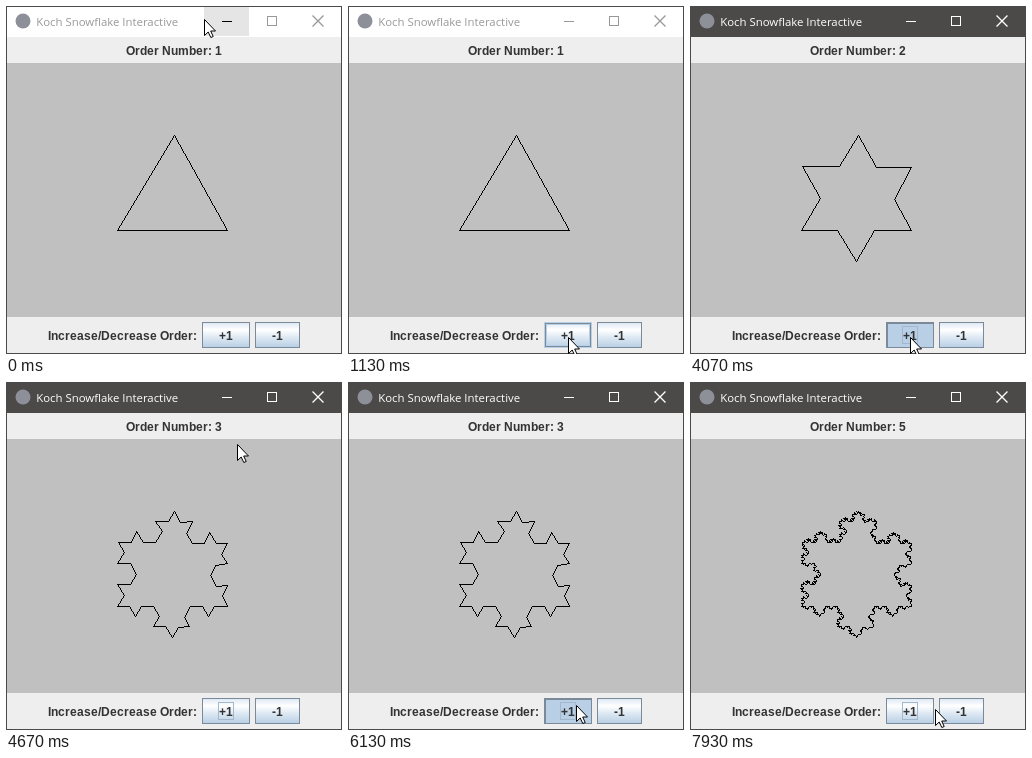
Animation, 336 px wide and 348 px high, one loop 8000 ms. Source, as an HTML page:

```html
<!DOCTYPE html>
<html lang="en">
<head>
<meta charset="utf-8">
<title>Koch Snowflake Interactive</title>
<style>
  html, body { margin: 0; width: 100%; height: 100%; overflow: hidden; }
  svg { display: block; width: 100vw; height: 100vh; }
  .crisp { shape-rendering: crispEdges; }
  .caption { font: 11.4px "Open Sans", "Noto Sans", sans-serif; fill: #999; }
  .label { font: bold 12px "Liberation Sans", Arial, sans-serif; fill: #333; }
  .control { fill: none; stroke: #999; }
  .bar { fill: #fff; }
  .active .bar { fill: #4c4a48; }
  .active .caption { fill: #fff; }
  .active .control { stroke: #fff; }
  #minHover, #rollover, #pressed, #focus { visibility: hidden; }
  .minimise #minHover, .over #rollover, .down #pressed, .active #focus { visibility: visible; }
  .down #rollover { visibility: hidden; }
  .minimise #min { stroke: #000; }
</style>
</head>
<body>
<svg id="stage" viewBox="0 0 336 348">
  <defs>
    <linearGradient id="ocean" x2="0" y2="1">
      <stop offset="0" stop-color="#dde8f3"/>
      <stop offset=".3" stop-color="#fff"/>
      <stop offset=".6" stop-color="#dde8f3"/>
      <stop offset="1" stop-color="#b8cfe5"/>
    </linearGradient>
  </defs>

  <g class="crisp">
    <rect width="336" height="348" fill="#4c4a48"/>
    <rect x="1" y="1" width="334" height="346" fill="#eee"/>
    <rect class="bar" x="1" y="1" width="334" height="30"/>
    <rect x="1" y="57" width="334" height="254" fill="#c0c0c0"/>
    <rect id="minHover" x="198" y="1" width="45" height="29" fill="#e5e5e5"/>
  </g>
  <circle cx="17" cy="15" r="7.5" fill="#8d8f99"/>
  <text class="caption" x="30.2" y="20">Koch Snowflake Interactive</text>
  <path id="min" class="control crisp" d="M216 15.5h10"/>
  <path class="control crisp" d="M261.5 10.5h9v9h-9z"/>
  <path class="control" stroke-width="1.3" stroke-linecap="square" d="M307 10l10 10m0-10l-10 10"/>

  <text id="order" class="label" x="120" y="49">Order Number: 1</text>
  <path id="curve" class="crisp"/>

  <text class="label" x="42" y="334">Increase/Decrease Order:</text>
  <g class="crisp" fill="none">
    <rect x="196.5" y="316.5" width="47" height="25" fill="url(#ocean)" stroke="#7a8a99"/>
    <rect x="249.5" y="316.5" width="44" height="25" fill="url(#ocean)" stroke="#7a8a99"/>
    <g id="rollover" stroke="#b8cfe5">
      <rect x="196.5" y="316.5" width="47" height="25"/>
      <rect x="198.5" y="318.5" width="43" height="21"/>
      <rect x="197.5" y="317.5" width="45" height="23" stroke="#7a8a99"/>
    </g>
    <g id="pressed" stroke="#7a8a99">
      <rect x="196.5" y="316.5" width="47" height="25" fill="#b8cfe5"/>
      <path d="M197.5 341V317.5H243"/>
    </g>
    <rect id="focus" x="212.5" y="320.5" width="15" height="17" stroke="#a3b8cc"/>
  </g>
  <text class="label" x="213" y="334">+1</text>
  <text class="label" x="266" y="334">-1</text>

  <path id="cursor" fill="#fff" stroke="#000" stroke-linejoin="round"
        d="M.5 .5V16.5L4.2 13 6.8 18.5 9.2 17.5 6.7 12H11.5Z"/>
</svg>

<script>
const LOOP = 8000, TICK = 1000 / 15;

const triangle = [[168, 129], [111, 224], [221, 224]];

// Cursor travel, times in ticks
const home = [198, 13];
const moves = [
  { from: 0, to: 3, tip: [168, 209] },
  { from: 7, to: 17, tip: [220, 331] },
  { from: 62, to: 73, tip: [232, 50] },
  { from: 75, to: 86, tip: [228, 323] },
  { from: 117, to: 119, tip: [245, 327] }
];
const activated = 32;
const presses = [[32, 34], [61, 62], [92, 94], [107, 109]];

const $ = id => document.getElementById(id);
const stage = $("stage");

// Replaces every edge by four, in integer arithmetic
function subdivide(points) {
  const k = Math.sqrt(3) / 6, int = Math.trunc;
  return points.flatMap(([x1, y1], i) => {
    const [x5, y5] = points[(i + 1) % points.length];
    const dx = x5 - x1, dy = y5 - y1;
    return [
      [x1, y1],
      [x1 + int(dx / 3), y1 + int(dy / 3)],
      [int((x1 + x5) / 2 - k * dy), int((y1 + y5) / 2 + k * dx)],
      [x1 + int(2 * dx / 3), y1 + int(2 * dy / 3)]
    ];
  });
}

// Unsmoothed one-pixel outline
function outline(points) {
  let d = "";
  points.forEach(([x1, y1], i) => {
    const [x2, y2] = points[(i + 1) % points.length];
    const steps = Math.max(Math.abs(x2 - x1), Math.abs(y2 - y1));
    for (let s = 0; s < steps; s++) {
      const x = Math.round(x1 + (x2 - x1) * s / steps);
      const y = Math.round(y1 + (y2 - y1) * s / steps);
      d += `M${x} ${y}h1v1h-1z`;
    }
  });
  return d;
}

const shapes = [triangle];
while (shapes.length < 5) shapes.push(subdivide(shapes.at(-1)));
const curves = shapes.map(outline);

// Labels advance by whole pixels per letter
const pen = document.createElement("canvas").getContext("2d");
function snapLetters(text) {
  pen.font = getComputedStyle(text).font;
  let x = parseFloat(text.getAttribute("x"));
  const places = [...text.textContent].map(letter => {
    const place = x;
    x += Math.round(pen.measureText(letter).width);
    return place;
  });
  text.setAttribute("x", places.join(" "));
}
document.querySelectorAll(".label").forEach(snapLetters);

const easeOut = p => 1 - (1 - p) ** 2.4;

function cursorAt(tick) {
  let tip = home;
  for (const move of moves) {
    if (tick <= move.from) break;
    const p = easeOut(Math.min(1, (tick - move.from) / (move.to - move.from)));
    tip = tip.map((v, i) => Math.round(v + (move.tip[i] - v) * p));
  }
  return tip;
}

const inside = ([x, y], left, top, right, bottom) =>
  x >= left && x < right && y >= top && y < bottom;

let shown = -1;
function draw(now) {
  // The small lead absorbs clock rounding to 10 ms
  const tick = Math.floor(((now % LOOP) + 3.4) / TICK) % 120;
  if (tick === shown) return;
  shown = tick;
  const tip = cursorAt(tick);
  const done = presses.filter(press => tick >= press[1]).length;
  stage.classList.toggle("active", tick >= activated);
  stage.classList.toggle("minimise", inside(tip, 198, 1, 243, 30));
  stage.classList.toggle("over", inside(tip, 196, 316, 244, 342));
  stage.classList.toggle("down", presses.some(([a, b]) => tick >= a && tick < b));
  $("order").textContent = `Order Number: ${done + 1}`;
  $("curve").setAttribute("d", curves[done]);
  $("cursor").setAttribute("transform", `translate(${tip})`);
}

let start;
function loop(now) {
  start ??= now;
  draw(now - start);
  requestAnimationFrame(loop);
}
draw(0);
requestAnimationFrame(loop);
</script>
</body>
</html>
```
